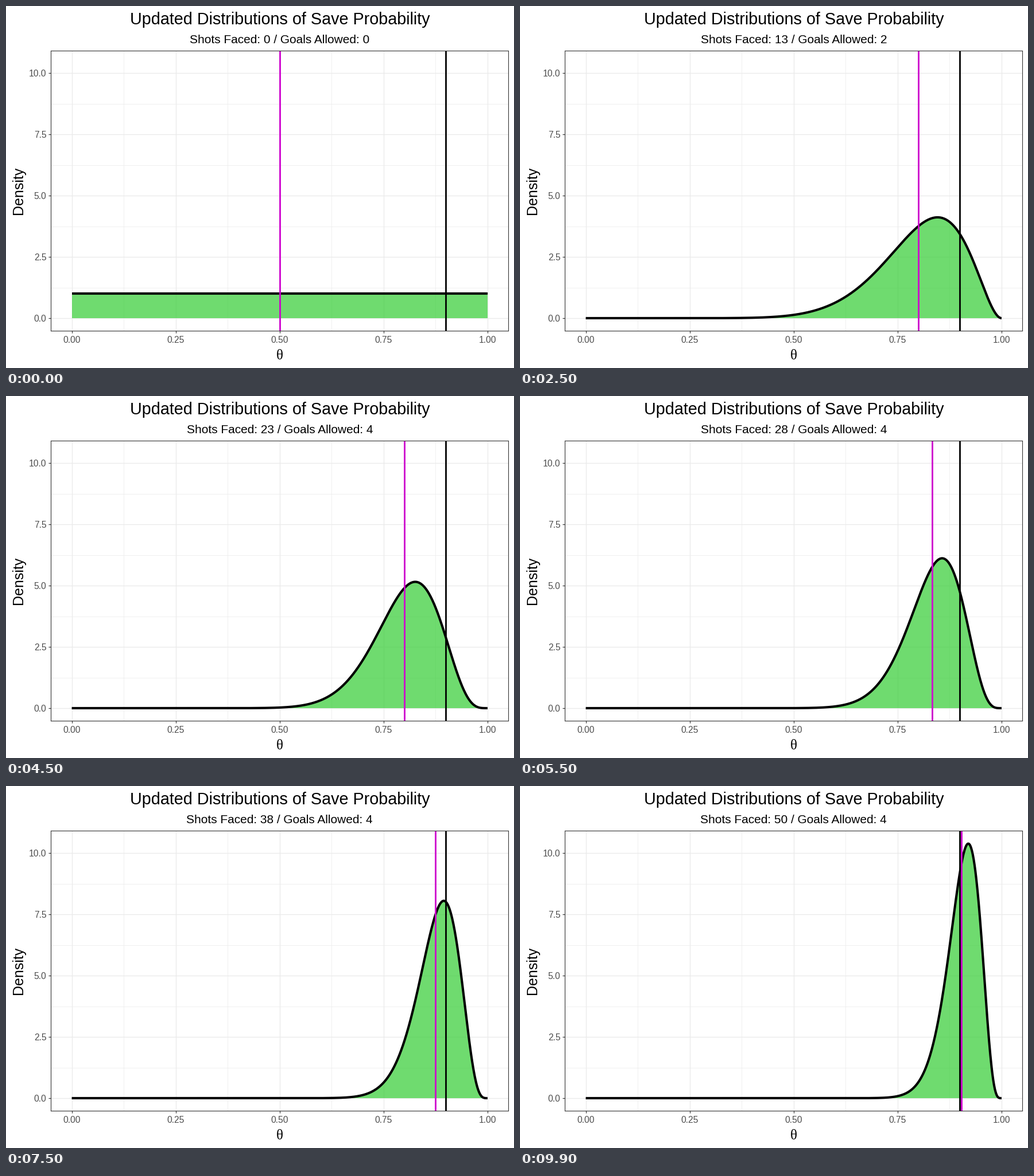
A matplotlib script that plays this animation: 885 by 632 pixels, repeating every 10 s.

```python
from math import comb

import matplotlib.pyplot as plt
import numpy as np
from matplotlib.animation import FuncAnimation

W, H, DPI = 885, 632, 100
LEFT, RIGHT, TOP, BOTTOM = 78.4, 875.1, 78.4, 567.2
SHOTS = 50
GOALS = (4, 7, 18, 21)  # shots that went in
TRUE_RATE = 0.9
GRID, INK, LABEL = "#EBEBEB", "#333333", "#4D4D4D"
FILL, MEAN = "#32CD32", "#CD00CD"

plt.rcParams["font.family"] = "Liberation Sans"
theta = np.linspace(0, 1, 1001)


def pt(px):
    return px * 72 / DPI


def posterior(x, saves, goals):
    """Beta(saves + 1, goals + 1) density."""
    n = saves + goals
    return (n + 1) * comb(n, goals) * x**saves * (1 - x)**goals


fig = plt.figure(figsize=(W / DPI, H / DPI), dpi=DPI, facecolor="white")
ax = fig.add_axes([LEFT / W, 1 - BOTTOM / H, (RIGHT - LEFT) / W, (BOTTOM - TOP) / H])


def write(x, y, text, size, **kw):
    kw = {"ha": "center", "va": "baseline", "color": "black", **kw}
    return fig.text(x / W, 1 - y / H, text, fontsize=pt(size), **kw)


def style_axes():
    peak = posterior(0.92, SHOTS - len(GOALS), len(GOALS))
    ax.set_xlim(-0.05, 1.05)
    ax.set_ylim(-0.05 * peak, 1.05 * peak)
    ax.set_axisbelow(True)
    ax.set_xticks(np.arange(0, 1.01, 0.25))
    ax.set_yticks(np.arange(0, 10.1, 2.5))
    ax.set_xticks(np.arange(0.125, 1, 0.25), minor=True)
    ax.set_yticks(np.arange(1.25, 10, 2.5), minor=True)
    ax.grid(which="major", color=GRID, linewidth=pt(1.4))
    ax.grid(which="minor", color=GRID, linewidth=pt(0.7))
    ax.tick_params(which="minor", length=0)
    ax.tick_params(which="major", length=pt(4), width=pt(1.2), color=INK,
                   labelbottom=False, labelleft=False)
    for spine in ax.spines.values():
        spine.set(color=INK, linewidth=pt(1.1))

    to_px = ax.transData.transform
    for x in ax.get_xticks():
        write(to_px((x, 0))[0], 588.5, f"{x:.2f}", 15.6, color=LABEL)
    for y in ax.get_yticks():
        write(70.5, H - to_px((0, y))[1] + 6.3, f"{y:.1f}", 15.6, color=LABEL, ha="right")


style_axes()
mid = (LEFT + RIGHT) / 2
write(mid, 32, "Updated Distributions of Save Probability", 28.7)
subtitle = write(mid, 65, "", 20.9)
write(mid, 617, "θ", 25, family="Liberation Serif")
write(29.5, 322.8, "Density", 25, rotation=90, ha="right", va="center").set(
    ha="center", x=21.8 / W)

area, = ax.fill([0], [0], color=FILL, alpha=0.7, linewidth=0, zorder=1)
curve, = ax.plot([], [], color="black", linewidth=pt(4.1), zorder=2,
                 solid_capstyle="butt", solid_joinstyle="round")
ax.axvline(TRUE_RATE, color="black", linewidth=pt(2.8), zorder=2.1, snap=True)
mean_line = ax.axvline(0.5, color=MEAN, linewidth=pt(2.8), zorder=2.2, snap=True)


def update(frame):
    shots = (frame + 1) // 2
    goals = sum(g <= shots for g in GOALS)
    saves = shots - goals
    density = posterior(theta, saves, goals)
    curve.set_data(theta, density)
    area.set_xy(np.column_stack([np.r_[0, theta, 1], np.r_[0, density, 0]]))
    mean = (saves + 1) / (shots + 2)
    mean_line.set_xdata([mean, mean])
    subtitle.set_text(f"Shots Faced: {shots} / Goals Allowed: {goals}")
    return area, curve, mean_line, subtitle


anim = FuncAnimation(fig, update, frames=2 * SHOTS, interval=100,
                     repeat=True, repeat_delay=0, blit=False)
plt.show()
```
